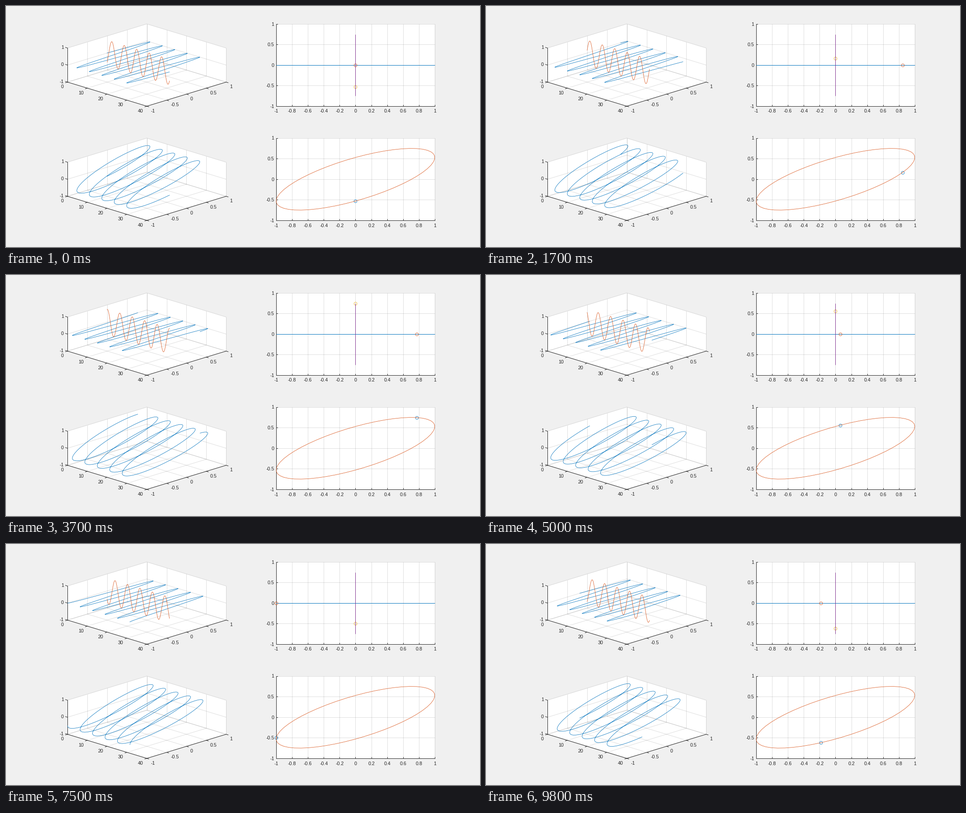
Write a matplotlib script that moves like this. It is 1049x534 px and loops after 9.9 s.

```python
import numpy as np
import matplotlib.pyplot as plt
from matplotlib.animation import FuncAnimation

W, H, DPI = 1049, 534, 64
PX = 72 / DPI  # points per pixel
THIN = 0.78 * PX
BLUE, RED, YELLOW, PURPLE = "#0072BD", "#D95319", "#EDB120", "#7E2F8E"
INK = "#262626"
ROW = 253  # vertical distance between the two rows of plots

plt.rcParams["font.family"] = "Liberation Sans"
fig = plt.figure(figsize=(W / DPI, H / DPI), dpi=DPI, facecolor="#F0F0F0")
ax = fig.add_axes([0, 0, 1, 1])
ax.set_xlim(0, W)
ax.set_ylim(H, 0)
ax.axis("off")


def line(points, color, z=3, lw=PX, **kw):
    xs, ys = zip(*points)
    ax.plot(xs, ys, color=color, lw=lw, zorder=z, **kw)


def grid(*points):
    line(points, INK, 2, alpha=0.15, solid_capstyle="butt")


def axis_lines(*points):
    # Separate segments keep the upright and level ones crisp.
    for a, b in zip(points, points[1:]):
        line([a, b], INK)


def panel(points):
    ax.fill(*zip(*points), color="white", lw=0, zorder=1)


def label(x, y, value, ha):
    ax.text(x, y, f"{value:g}", color=INK, ha=ha, va="center",
            fontsize=10.67 * PX, zorder=3)


def project(x, y, z, dy):
    """Place a point of the 3-D box, seen at 45 degrees, on the stage."""
    u, v, w = x / 40, (y + 1) / 2, (z + 1) / 2
    return 136.1 + 175.55 * (u + v), 168.6 + 53.37 * (u - v) - 75.47 * w + dy


def flat(x, y, dy):
    return 773.4 + 175.55 * x, 130.9 - 91.1 * y + dy


def box_3d(dy):
    def p(x, y, z):
        return project(x, y, z, dy)

    panel([p(0, -1, -1), p(40, -1, -1), p(40, 1, -1),
           p(40, 1, 1), p(0, 1, 1), p(0, -1, 1)])
    for x in range(0, 41, 10):
        grid(p(x, -1, -1), p(x, 1, -1))
        grid(p(x, 1, -1), p(x, 1, 1))
        a, b = p(x, -1, -1)
        line([(a, b), (a - 4.5, b + 1.4)], INK)
        label(a - 8.2, b + 10.7, x, "right")
    for y in np.linspace(-1, 1, 5):
        grid(p(0, y, -1), p(40, y, -1))
        grid(p(0, y, -1), p(0, y, 1))
        a, b = p(40, y, -1)
        line([(a, b), (a + 4.5, b + 1.4)], INK)
        label(a + 8.5, b + 10.7, y, "left")
    for z in (-1, 0, 1):
        grid(p(0, -1, z), p(0, 1, z))
        grid(p(0, 1, z), p(40, 1, z))
        a, b = p(0, -1, z)
        line([(a, b), (a - 4.5, b - 1.4)], INK)
        label(a - 8.5, b - 0.7, z, "right")
    axis_lines(p(0, -1, 1), p(0, -1, -1), p(40, -1, -1), p(40, 1, -1))


def box_2d(dy):
    def p(x, y):
        return flat(x, y, dy)

    panel([p(-1, -1), p(1, -1), p(1, 1), p(-1, 1)])
    for x in np.linspace(-1, 1, 11).round(1):
        grid(p(x, -1), p(x, 1))
        a, b = p(x, -1)
        line([(a, b), (a, b - 3.5)], INK)
        label(a, b + 11.5, x + 0.0, "center")
    for y in np.linspace(-1, 1, 5):
        grid(p(-1, y), p(1, y))
        a, b = p(-1, y)
        line([(a, b), (a + 3.5, b)], INK)
        label(a - 4.3, b + 0.7, y, "right")
    axis_lines(p(-1, 1), p(-1, -1), p(1, -1))


def curve(color, z):
    return ax.plot([], [], color=color, lw=THIN, zorder=z)[0]


def marker(color, z):
    return ax.plot([], [], "o", mfc="none", mec=color, ms=6.7 * PX,
                   mew=THIN, zorder=z)[0]


for offset in (0, ROW):
    box_3d(offset)
    box_2d(offset)

wave_y = curve(BLUE, 4)
wave_z = curve(RED, 5)
helix = curve(BLUE, 4)
line([flat(-1, 0, 0), flat(1, 0, 0)], BLUE, 4, solid_capstyle="butt")
dot_x = marker(RED, 5)
dot_y = marker(YELLOW, 6)
line([flat(0, 0.75, 0), flat(0, -0.75, 0)], PURPLE, 7, solid_capstyle="butt")
dot_xy = marker(BLUE, 4)
ellipse = curve(RED, 5)

t = np.linspace(0, 10 * np.pi, 251)


def field(phase):
    return np.sin(phase), 0.75 * np.sin(phase - np.pi / 4)


def update(tick):
    phase = 2 * np.pi * max(tick - 1, 0) / 100  # the first pose holds twice
    y, z = field(t + phase)
    wave_y.set_data(*project(t, y, 0, 0))
    wave_z.set_data(*project(t, 0, z, 0))
    helix.set_data(*project(t, y, z, ROW))
    ellipse.set_data(*flat(y[:51], z[:51], ROW))
    for dot, (a, b) in ((dot_x, flat(y[0], 0, 0)),
                        (dot_y, flat(0, z[0], 0)),
                        (dot_xy, flat(y[0], z[0], ROW))):
        dot.set_data([a], [b])
    return wave_y, wave_z, helix, ellipse, dot_x, dot_y, dot_xy


anim = FuncAnimation(fig, update, frames=99, interval=100, repeat=True,
                     repeat_delay=0)
plt.show()
```
